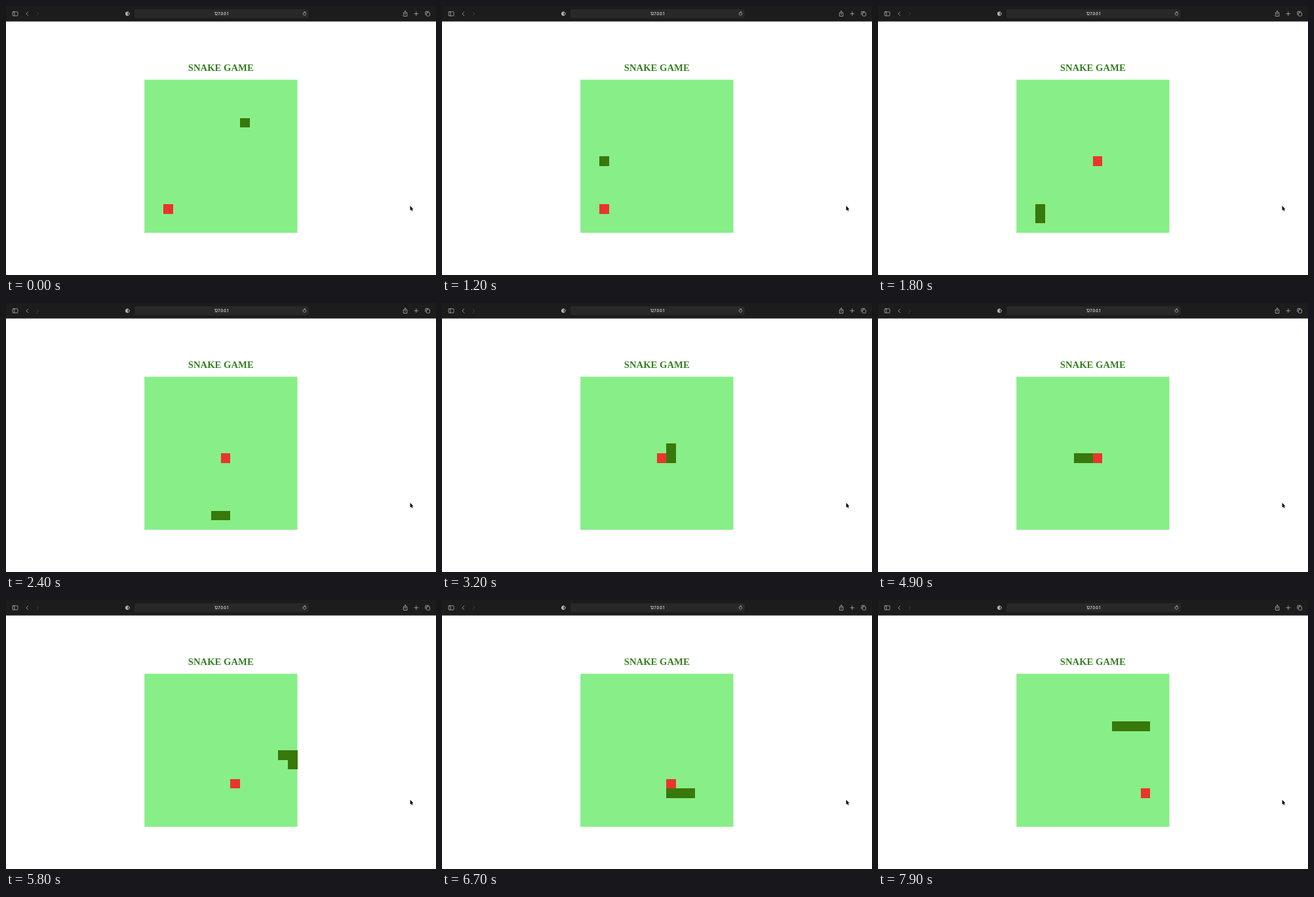
These frames come from a looping animation (656x410 px, 8000 ms). An HTML page:

```html
<!DOCTYPE html>
<html lang="en">
<head>
<meta charset="utf-8">
<title>Snake game</title>
<style>
  html, body { margin: 0; width: 100%; height: 100%; overflow: hidden; background: #fff; }
  svg { display: block; width: 656px; height: 410px; }
  .icon { fill: none; stroke: #b4b4b4; stroke-width: .8; stroke-linecap: round; stroke-linejoin: round; }
  .address { font: 500 5.5px Inter, "Liberation Sans", sans-serif; fill: #f2f2f2; text-anchor: middle; }
  .title { font: bold 14.7px "Liberation Serif", "Times New Roman", serif; fill: #377e22; text-anchor: middle; }
  .cells { shape-rendering: crispEdges; }
</style>
</head>
<body>
<svg viewBox="0 0 656 410">
  <rect width="656" height="410" fill="#fff"/>

  <rect width="656" height="23.6" fill="#1c1c1c"/>
  <rect x="196" y="5" width="265.5" height="13.6" rx="2.6" fill="#282828"/>
  <text class="address" x="328.5" y="13.7">127.0.0.1</text>
  <g class="icon">
    <rect x="10" y="8.8" width="8" height="6.2" rx="1"/>
    <path d="M12.8 8.8v6.2"/>
    <path d="M33.6 9.2l-2.7 2.7 2.7 2.7"/>
    <path d="M47 9.2l2.7 2.7-2.7 2.7" stroke="#4c4c4c"/>
    <circle cx="185.4" cy="11.8" r="2.9"/>
    <path d="M185.4 8.9a2.9 2.9 0 0 0 0 5.8z" fill="#b4b4b4"/>
    <path d="M457.9 11.4a2.4 2.4 0 1 1-1.1-1.7M455.5 8.4l1.5 1.3-1.4 1.4"/>
    <path d="M607.6 10.5h-1.3v5h5.6v-5h-1.3M609.1 13V7.8M607.5 9.2l1.6-1.6 1.6 1.6"/>
    <path d="M622.9 11.8h5.8M625.8 8.9v5.8"/>
    <rect x="641.4" y="10" width="5.2" height="5.2" rx="1"/>
    <path d="M639.8 13.2V9.3a1 1 0 0 1 1-1h4"/>
  </g>

  <text class="title" x="327.8" y="98.9">SNAKE GAME</text>
  <rect x="211.2" y="112.4" width="233.3" height="233.3" fill="#87ee88"/>
  <g id="cells" class="cells"></g>

  <path d="M616.6 304.5v7.2l1.6-1.5 1.1 2.6 1.2-.5-1.1-2.5h2.1z"
        fill="#000" stroke="#fff" stroke-width=".6" paint-order="stroke"/>
</svg>
<script>
  const STEP = 100, FRAMES = 80;
  const CELL = 233.3 / 16, LEFT = 211.2, TOP = 112.4;
  const SNAKE = '#39780b', FOOD = '#ea352b';
  const DIRS = { L: [-1, 0], R: [1, 0], U: [0, -1], D: [0, 1] };
  // Direction and number of steps; W is a pause.
  const ROUTE = 'L8 D10 R7 U7 L9 D1 R15 D4 L6 U7 R1 W1 R3';
  const FOODS = [[2, 13], [8, 8], [9, 11], [13, 12]];
  const group = document.getElementById('cells');

  function buildFrames() {
    let snake = [[10, 4]], eaten = 0;
    const frames = [{ snake, food: FOODS[0] }];
    for (const leg of ROUTE.split(' ')) {
      const dir = DIRS[leg[0]];
      for (let n = +leg.slice(1); n > 0; n--) {
        if (dir) {
          const [x, y] = snake[0];
          const fed = String(snake[0]) === String(FOODS[eaten]);
          snake = [[x + dir[0], y + dir[1]], ...(fed ? snake : snake.slice(0, -1))];
          if (fed) eaten++;
        }
        frames.push({ snake, food: FOODS[eaten] });
      }
    }
    return frames;
  }

  function cell([col, row], fill) {
    const x = Math.round(LEFT + col * CELL), y = Math.round(TOP + row * CELL);
    const w = Math.round(LEFT + (col + 1) * CELL) - x;
    const h = Math.round(TOP + (row + 1) * CELL) - y;
    return `<rect x="${x}" y="${y}" width="${w}" height="${h}" fill="${fill}"/>`;
  }

  const frames = buildFrames();
  let shown = -1;

  function draw() {
    const index = Math.floor(performance.now() / STEP) % FRAMES;
    if (index !== shown) {
      const { snake, food } = frames[index];
      group.innerHTML = snake.map(part => cell(part, SNAKE)).join('') + cell(food, FOOD);
      shown = index;
    }
    requestAnimationFrame(draw);
  }
  draw();
</script>
</body>
</html>
```
